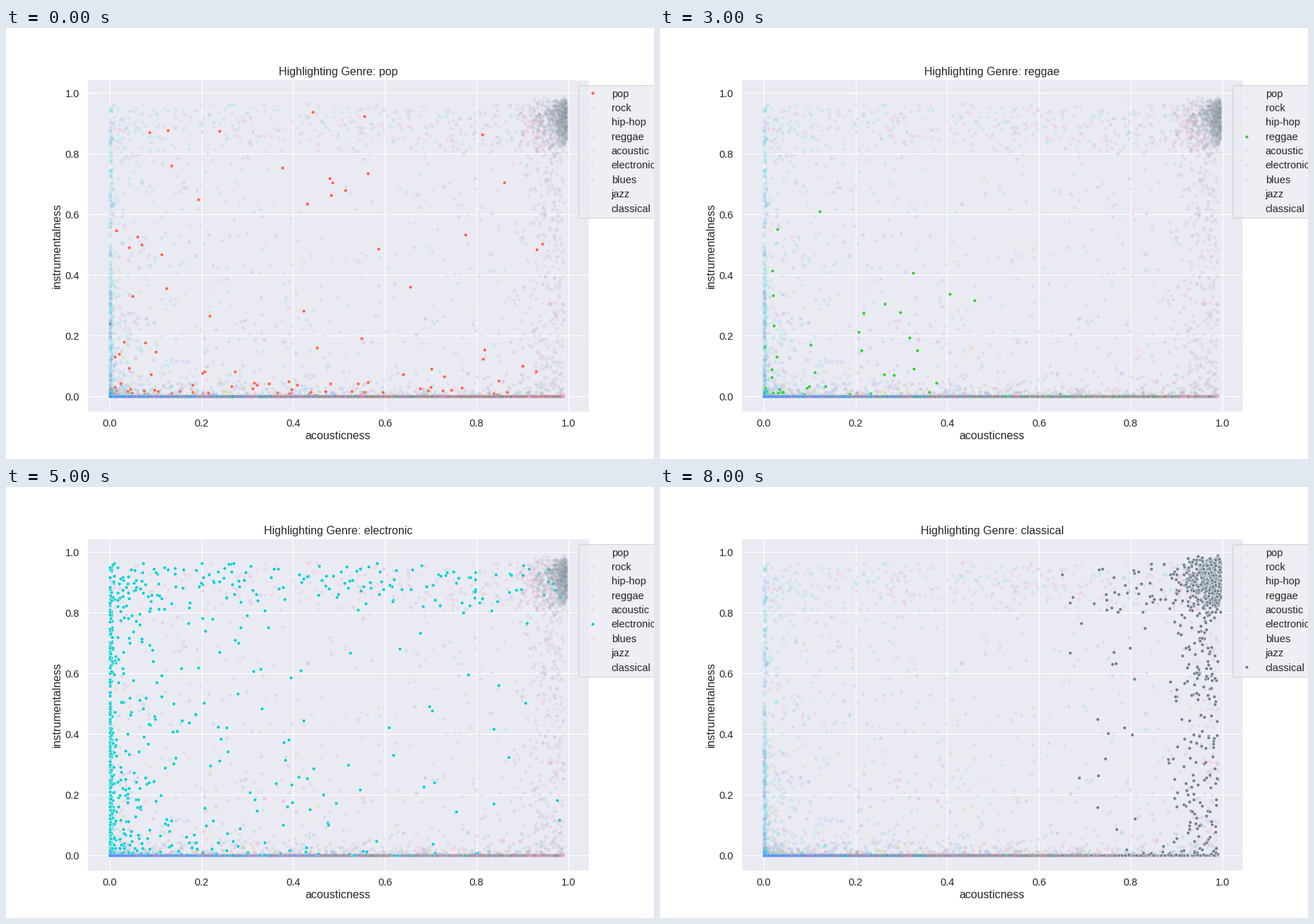
Write a matplotlib script that moves like this. It is 917 px wide and 611 px high and loops after 9 s.

```python
import matplotlib.pyplot as plt
import numpy as np
from matplotlib.animation import FuncAnimation
from matplotlib.colors import to_rgba
from matplotlib.lines import Line2D

W, H, DPI = 917, 611, 80
INK, PANEL = "#262626", "#eaeaf2"
FAINT = 0.11
SIZE, EDGE = 20, 0.48

plt.rcParams.update({
    "font.family": "Liberation Sans",
    "text.color": INK,
    "axes.labelcolor": INK,
    "axes.facecolor": PANEL,
    "axes.edgecolor": "white",
    "axes.linewidth": 1.25,
    "grid.color": "white",
    "grid.linewidth": 1,
})

COLORS = {
    "pop": "tomato",
    "rock": "#8022e8",
    "hip-hop": "gold",
    "reggae": "limegreen",
    "acoustic": "seagreen",
    "electronic": "darkturquoise",
    "blues": "dodgerblue",
    "jazz": "#ff5fae",
    "classical": "slategray",
}
GENRES = list(COLORS)

# Faint legend markers; the last two genres show none while idle
TINTS = ["hotpink", "hotpink", "gold", "darkturquoise",
         "mediumpurple", "mediumpurple", "darkturquoise"]

rng = np.random.default_rng(7)


def beta(n, a, b, high=0.99, low=0.0):
    return low + (high - low) * rng.beta(a, b, n)


def floor(n, a, b, low=0.0):
    """Tracks with no instrumental score at all."""
    return beta(n, a, b, low=low), np.zeros(n)


def haze(n, a, b, high=0.12, low=0.0):
    """Tracks hovering just above the floor."""
    return beta(n, a, b, low=low), beta(n, 0.5, 5, high)


def wall(n, width, b=1.0):
    """Tracks stacked along the left side."""
    return beta(n, 0.5, 3, width), beta(n, 0.7, b, 0.95)


def wide(n, a, b, c, d, low=0.0):
    """Tracks scattered over the whole height."""
    return beta(n, a, b, low=low), beta(n, c, d, 0.95)


def band(n, a, b, low=0.0):
    """Highly instrumental tracks along the top."""
    return beta(n, a, b, low=low), beta(n, 2.4, 1.5, 0.97, 0.76)


def corner(n, left, bottom):
    """Acoustic and instrumental at once."""
    return beta(n, 3, 0.9, 0.996, left), beta(n, 3, 2, 0.99, bottom)


CLOUDS = {
    "pop": [floor(700, 0.7, 1.3), haze(70, 0.6, 1.1),
            wide(35, 0.6, 1.1, 0.6, 2.5), wide(35, 0.7, 0.8, 1, 0.8)],
    "rock": [floor(600, 0.4, 2), haze(130, 0.4, 1.5), wall(50, 0.006, 1.6),
             wide(60, 0.4, 3, 0.5, 4), wide(55, 0.6, 1.2, 0.8, 1.1)],
    "hip-hop": [floor(700, 0.6, 2.5), haze(120, 0.6, 2),
                wide(35, 0.6, 2, 0.6, 2.5)],
    "reggae": [floor(600, 0.7, 1.8), haze(35, 0.6, 1.8, 0.06),
               wide(30, 0.6, 2.2, 0.8, 3)],
    "acoustic": [floor(700, 1.3, 1.5), haze(130, 1, 1),
                 wide(70, 1.2, 0.8, 0.4, 1.3)],
    "electronic": [floor(200, 0.4, 1.8), haze(60, 0.5, 1.8), wall(170, 0.012),
                   wide(240, 0.4, 4.5, 0.6, 0.9), band(160, 0.6, 1),
                   wide(110, 0.6, 1.1, 0.7, 0.9)],
    "blues": [floor(750, 0.5, 2.6), haze(150, 0.5, 1),
              wide(110, 0.7, 1, 0.5, 1.5)],
    "jazz": [floor(420, 1.3, 1), haze(80, 1, 0.9), band(170, 0.9, 0.8),
             wide(90, 2, 1, 0.7, 0.9, low=0.89),
             wide(170, 0.8, 0.8, 0.9, 0.9), band(50, 2, 2, low=0.88)],
    "classical": [floor(60, 2.5, 0.9, low=0.6), haze(40, 2.5, 1, low=0.7),
                  corner(380, 0.87, 0.78), corner(380, 0.955, 0.81),
                  band(50, 2, 1, low=0.65),
                  wide(190, 2.2, 1.1, 0.9, 0.8, low=0.88),
                  wide(60, 2.2, 1, 0.9, 0.8, low=0.57)],
}

fig, ax = plt.subplots(figsize=(W / DPI, H / DPI), dpi=DPI, facecolor="white")
fig.subplots_adjust(left=0.125, right=0.9, bottom=0.11, top=0.88)
ax.set(xlim=(-0.0498, 1.0458), ylim=(-0.0497, 1.0445))
ticks = np.arange(6) / 5
ax.set_xticks(ticks)
ax.set_yticks(ticks)
ax.tick_params(length=0, pad=9.5, labelsize=13.2, labelcolor=INK)
ax.grid(True)
ax.set_axisbelow(True)
ax.set_xlabel("acousticness", fontsize=14.4, labelpad=2.5)
ax.set_ylabel("instrumentalness", fontsize=14.4, labelpad=3)
title = ax.set_title("", fontsize=14.4, pad=5.6)

layers = []
for z, genre in enumerate(GENRES):
    x, y = np.hstack(CLOUDS[genre])
    layers.append(ax.scatter(x, y, s=SIZE, color=COLORS[genre],
                             edgecolors="white", linewidths=EDGE,
                             zorder=3 + 0.01 * z))

keys = [Line2D([], [], ls="", marker="o", ms=SIZE ** 0.5, mew=EDGE)
        for _ in GENRES]
legend = ax.legend(keys, GENRES, loc="upper left", bbox_to_anchor=(0.968, 1),
                   fontsize=13.2, labelspacing=0.435, facecolor=PANEL,
                   edgecolor="0.8", framealpha=0.8)
legend.set_zorder(5)


def show(active):
    title.set_text(f"Highlighting Genre: {GENRES[active]}")
    for i, (layer, key) in enumerate(zip(layers, legend.legend_handles)):
        on = i == active
        alpha = 1 if on else FAINT
        layer.set_alpha(alpha)
        key.set_visible(on or i < len(TINTS))
        color = COLORS[GENRES[i]] if on else TINTS[i % len(TINTS)]
        key.set_markerfacecolor(to_rgba(color, alpha))
        key.set_markeredgecolor(to_rgba("white", alpha))
    return [title, legend, *layers]


anim = FuncAnimation(fig, show, frames=len(GENRES), interval=1000,
                     repeat=True, repeat_delay=0, blit=False)
plt.show()
```
